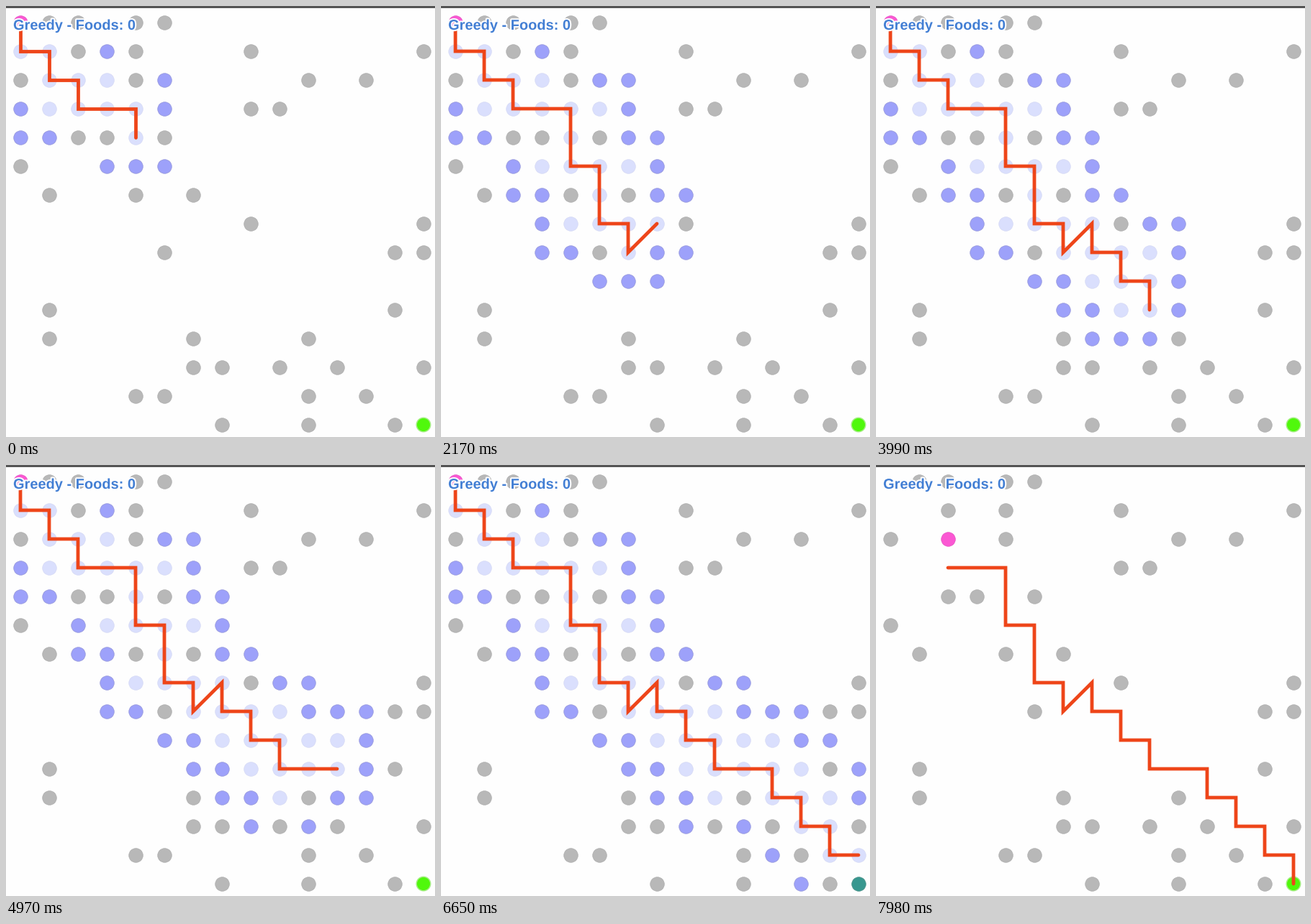
Write a matplotlib script that moves like this. It is 596x600 px and loops after 8 s.

```python
import numpy as np
import matplotlib.pyplot as plt
import matplotlib.patheffects as effects
from matplotlib.animation import FuncAnimation
from matplotlib.patches import Rectangle

plt.rcParams["text.hinting"] = "none"

WIDTH, HEIGHT, DPI = 596, 600, 100
LOOP, INTERVAL, TICK = 8000, 20, 70
SIZE, CELL = 15, 40
START, GOAL = (0, 0), (14, 14)
FIRST_STEP = 10

# Wall columns, row by row.
WALL_ROWS = ["1 2 4 5", "2 4 8 14", "0 4 10 12", "8 9", "2 3 5", "0", "1 4 6", "8 14",
             "5 13 14", "", "1 13", "1 6 10", "6 7 9 11 14", "4 5 10 12", "7 10 13"]
WALLS = {(int(col), row) for row, cols in enumerate(WALL_ROWS) for col in cols.split()}

# D: down, R: right, B: up and right.
MOVES = {"D": (0, 1), "R": (1, 0), "B": (1, -1)}
ROUTE = "DRDRDRRDDRDDRDBDRDRDRRDRDRDRD"

# Cells tried next to the route: 1 is up-right, -1 is down-left.
BRANCHES = {(2, 2): [-1], (2, 3): [1], (4, 4): [1, -1], (5, 6): [1, -1], (8, 8): [-1],
            (8, 9): [1], (9, 9): [-1], (9, 10): [1], (10, 10): [1, -1],
            (11, 11): [1], (12, 12): [1]}


def build_path():
    path = [START]
    for move in ROUTE:
        dx, dy = MOVES[move]
        x, y = path[-1]
        path.append((x + dx, y + dy))
    return path


def build_trails(path):
    """The line shown after each search step, in order."""
    trails = []
    for i, (x, y) in enumerate(path):
        trail = path[:i + 1]
        trails.append(trail)
        for side in BRANCHES.get((x, y), []):
            trails.append(trail + [(x + side, y - side)])
    return trails


def neighbours(cell):
    x, y = cell
    near = {(x + dx, y + dy) for dx in (-1, 0, 1) for dy in (-1, 0, 1)}
    return {(a, b) for a, b in near if 0 <= a < SIZE and 0 <= b < SIZE} - WALLS


def pixels(cells):
    points = np.array(list(cells), dtype=float).reshape(-1, 2)
    return points * CELL + (20, 23)


PATH = build_path()
TRAILS = build_trails(PATH)

fig = plt.figure(figsize=(WIDTH / DPI, HEIGHT / DPI), dpi=DPI, facecolor="#fefefe")
ax = fig.add_axes([0, 0, 1, 1])
ax.set_xlim(0, WIDTH)
ax.set_ylim(HEIGHT, 0)
ax.axis("off")


def px(length):
    return length * 72 / DPI


def dots(cells, face, edge, diameter=19.5, edge_width=0.8):
    points = pixels(cells)
    return ax.scatter(points[:, 0], points[:, 1], s=px(diameter) ** 2, c=face,
                      edgecolors=edge, linewidths=px(edge_width))


ax.add_patch(Rectangle((0, 0), WIDTH, 2.6, color="#555555", lw=0))
dots(WALLS, "#b8b8b8", "#afafaf")
opened_dots = dots([], "#9da1fa", "#9799dc")
closed_dots = dots([], "#dadffd", "#d6daf6")
agent_dot = dots([START], "#fb57d3", "#e655c4")
goal_glow = dots([GOAL], "#a5ee84", "none", 21)
goal_dot = dots([GOAL], "#50f80c", "none", 18)
goal_found = dots([GOAL], "#38978f", "#4a9088")
line, = ax.plot([], [], color="#ee4519", lw=px(4.8), solid_capstyle="round",
                solid_joinstyle="miter", zorder=3)
ax.text(10, 33, "Greedy - Foods: 0", family="Liberation Sans", weight="bold",
        size=px(20), color="#437fd4", va="baseline", zorder=4,
        path_effects=[effects.withStroke(linewidth=px(4), foreground="white")])


def update(frame):
    tick = (frame * INTERVAL + INTERVAL // 2) // TICK
    step = FIRST_STEP + (tick + 2) // 3
    searching = step < len(TRAILS)
    if searching:
        closed = {trail[-1] for trail in TRAILS[:step + 1]}
        opened = set().union(*(neighbours(cell) for cell in closed)) - closed
        trail, agent = TRAILS[step], START
    else:
        closed, opened = set(), set()
        index = step - len(TRAILS)
        trail, agent = PATH[index + 1:], PATH[index]
    found = GOAL in opened | closed

    opened_dots.set_offsets(pixels(opened - {GOAL}))
    closed_dots.set_offsets(pixels(closed - {START, GOAL}))
    agent_dot.set_offsets(pixels([agent]))
    goal_found.set_visible(found)
    goal_glow.set_visible(not found)
    goal_dot.set_visible(not found)
    line.set_data(*pixels(trail).T)
    return opened_dots, closed_dots, agent_dot, goal_glow, goal_dot, goal_found, line


animation = FuncAnimation(fig, update, frames=LOOP // INTERVAL, interval=INTERVAL,
                          repeat=True, repeat_delay=0, blit=False)
plt.show()
```
